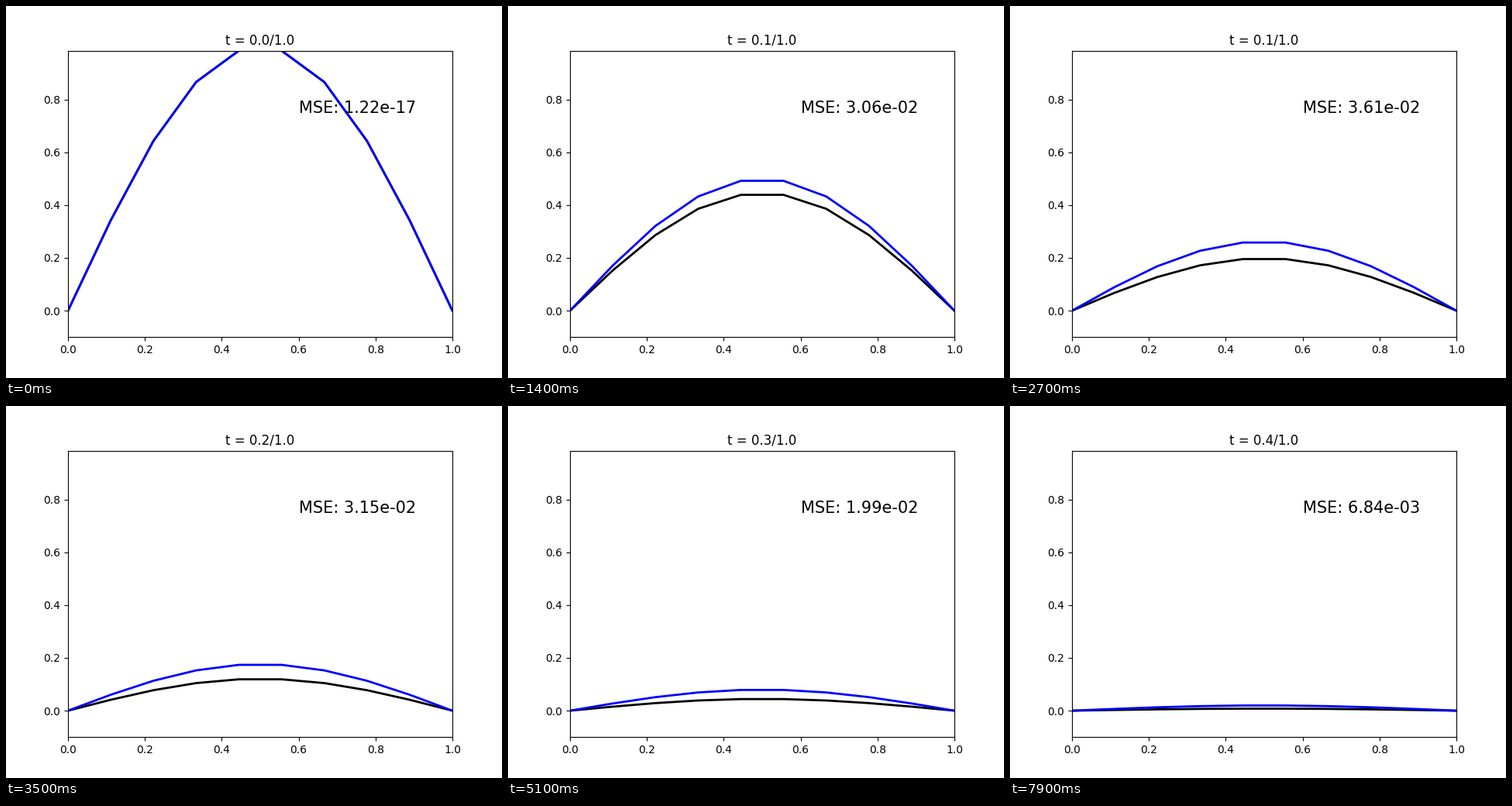
Recreate the animation shown at these times as a matplotlib script. Size 640 by 480 pixels, loop 8000 ms.

```python
import numpy as np
import matplotlib.pyplot as plt
from matplotlib.animation import FuncAnimation

FRAMES = 80
T_END = 1.0
NT = 200            # time samples over the full run
NX = 10             # grid points
R = 0.5             # dt / dx**2 of the explicit scheme

x = np.linspace(0, 1, NX)
times = np.linspace(0, T_END, NT)


def exact(t):
    return np.sin(np.pi * x) * np.exp(-np.pi ** 2 * t)


def solve():
    """Explicit heat equation; the first two states are the initial one."""
    u = exact(0)
    u[0] = u[-1] = 0
    states = [u, u]
    while len(states) < FRAMES:
        u = u.copy()
        u[1:-1] += R * (u[2:] - 2 * u[1:-1] + u[:-2])
        states.append(u)
    return states


states = solve()

fig, ax = plt.subplots(figsize=(6.4, 4.8), dpi=100)
ax.set_xlim(0, 1)
ax.set_ylim(-0.1, states[0].max())
approx_line, = ax.plot([], [], "k", lw=2)
exact_line, = ax.plot([], [], "b", lw=2)
error_text = ax.text(0.6, 0.75, "", fontsize=15)
title = ax.set_title("")


def update(i):
    t = times[i]
    u, v = states[i], exact(t)
    approx_line.set_data(x, u)
    exact_line.set_data(x, v)
    error_text.set_text(f"MSE: {np.mean(np.abs(u - v)):.2e}")
    title.set_text(f"t = {t:.1f}/{T_END:.1f}")
    return approx_line, exact_line, error_text, title


anim = FuncAnimation(fig, update, frames=FRAMES, interval=100,
                     repeat=True, repeat_delay=0, blit=False)
plt.show()
```
